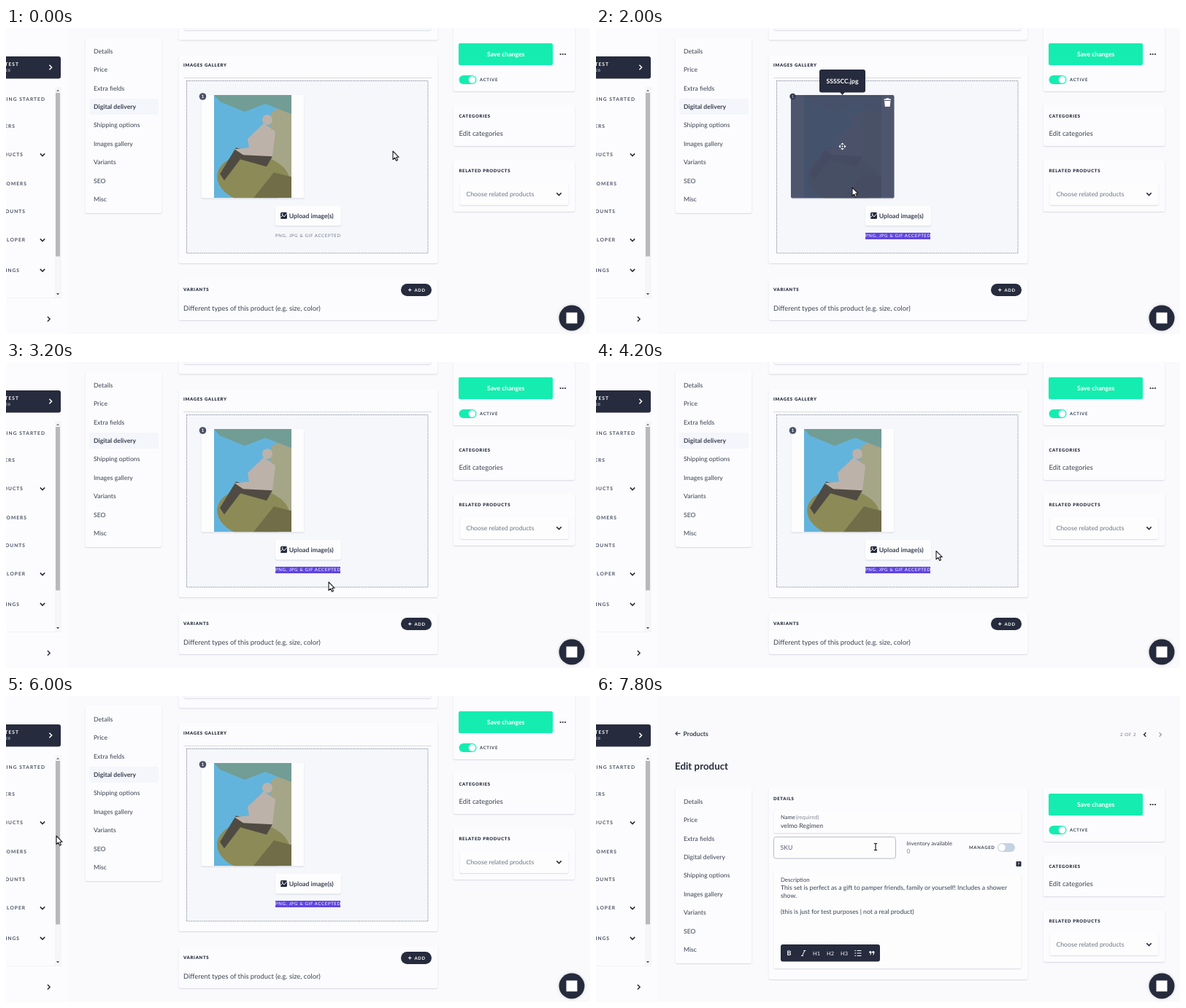
Write an HTML page with a canvas that moves like this. It is 800x420 px and loops after 8000 ms.

```html
<!DOCTYPE html>
<html lang="en">
<head>
<meta charset="utf-8">
<title>Product editor</title>
<style>
html, body { margin: 0; width: 100%; height: 100%; overflow: hidden; background: #fafafd; }
canvas { display: block; width: 800px; height: 420px; }
</style>
</head>
<body>
<canvas id="stage"></canvas>
<script>
const LOOP = 8000, STEP = 200;
const LIST_AT = 6400, EDIT_AT = 7200;
const INK = '#3a4153', DARK = '#262b3d', GREEN = '#15edb0', MUTED = '#6f7687';
const BG = '#fafafd', CARD = '#fcfcfe', LINE = '#d9dbe4';

const canvas = document.getElementById('stage');
const ctx = canvas.getContext('2d');
const dpr = window.devicePixelRatio || 1;
canvas.width = 800 * dpr;
canvas.height = 420 * dpr;
ctx.textRendering = 'geometricPrecision';

// Pointer path: time, x, y
const PATH = [
  [0, 530, 169], [400, 512, 235], [800, 457, 286], [1200, 366, 287], [1400, 372, 276],
  [1800, 353, 226], [2000, 351, 219], [2400, 354, 224], [2800, 398, 282], [3200, 442, 302],
  [3800, 462, 298], [4400, 468, 240], [5000, 380, 183], [5400, 262, 178], [6000, 69, 192],
  [6200, 22, 175], [6600, 291, 211], [7000, 216, 224], [7200, 225, 222], [7800, 383, 207]
];

function pointerAt(t) {
  const i = PATH.findIndex(p => p[0] > t);
  if (i < 0) return PATH[PATH.length - 1].slice(1);
  const [t0, x0, y0] = PATH[i - 1], [t1, x1, y1] = PATH[i];
  const k = (t - t0) / (t1 - t0);
  return [x0 + (x1 - x0) * k, y0 + (y1 - y0) * k];
}

const inside = (x, y, l, t, r, b) => x >= l && x <= r && y >= t && y <= b;
const unit = v => Math.max(0, Math.min(1, v));
const ramp = (t, start, end) => unit((t - start) / 200) - unit((t - end) / 200);

// ---- drawing helpers ----
function rect(x, y, w, h, color, r = 0) {
  ctx.fillStyle = color;
  ctx.beginPath();
  ctx.roundRect(x, y, w, h, r);
  ctx.fill();
}

function panel(x, y, w, h, color = CARD, r = 3) {
  ctx.save();
  ctx.shadowColor = 'rgba(40,48,85,.16)';
  ctx.shadowBlur = 1.5 * dpr;
  ctx.shadowOffsetY = dpr;
  rect(x + 0.5, y, w - 1, h, color, r);
  ctx.restore();
}

function circle(x, y, r, color) {
  ctx.fillStyle = color;
  ctx.beginPath();
  ctx.arc(x, y, r, 0, 7);
  ctx.fill();
}

function trace(points, close) {
  ctx.beginPath();
  points.forEach(([x, y]) => ctx.lineTo(x, y));
  if (close) ctx.closePath();
}

function poly(points, color) {
  trace(points, true);
  ctx.fillStyle = color;
  ctx.fill();
}

function line(points, color, width = 1) {
  trace(points);
  ctx.strokeStyle = color;
  ctx.lineWidth = width;
  ctx.stroke();
}

// y is the middle of the capitals
function text(str, x, y, { size = 8.67, weight = 400, color = INK, align = 'left', gap = 0 } = {}) {
  ctx.font = `${weight} ${size}px Lato, sans-serif`;
  ctx.letterSpacing = gap + 'px';
  ctx.textAlign = align;
  ctx.fillStyle = color;
  ctx.fillText(str, x, y + size * 0.36);
}

const caps = (str, x, y, opts) => text(str, x, y, { size: 6, gap: 0.67, weight: 700, ...opts });
const heading = (str, x, y) => caps(str, x, y, { weight: 900, color: DARK });

function chevron(x, y, dir, color = DARK, s = 3.2) {
  ctx.save();
  ctx.translate(x, y);
  ctx.rotate({ right: 0, down: 1, left: 2, up: 3 }[dir] * Math.PI / 2);
  line([[-s / 2, -s], [s / 2, 0], [-s / 2, s]], color, 1.5);
  ctx.restore();
}

function dots(x, y) {
  for (const d of [-3.2, 0, 3.2]) circle(x + d, y, 1.1, DARK);
}

function addButton(x, y) {
  rect(x, y, 42, 17, DARK, 8.5);
  line([[x + 10, y + 8.5], [x + 14.5, y + 8.5]], '#fff');
  line([[x + 12.2, y + 6.2], [x + 12.2, y + 10.8]], '#fff');
  caps('ADD', x + 18.5, y + 8.5, { color: '#fff' });
}

function toggle(x, y, on) {
  rect(x, y, 24, 12, on ? GREEN : '#c5d2e2', 6);
  circle(x + (on ? 18 : 6), y + 6, 4.8, '#fff');
}

function chat(x) {
  ctx.save();
  ctx.shadowColor = 'rgba(0,0,0,.18)';
  ctx.shadowBlur = 4 * dpr;
  circle(x, 398, 17.5, '#252b3c');
  ctx.restore();
  rect(x - 7.5, 390.5, 15, 15, '#fff');
}

// ---- pictures ----
function artwork(x, y, w, h) {
  ctx.save();
  ctx.translate(x, y);
  ctx.scale(w / 106, h / 141);
  ctx.beginPath();
  ctx.rect(0, 0, 106, 141);
  ctx.clip();
  rect(0, 0, 106, 141, '#62b4dc');
  poly([[78, 24], [106, 8], [106, 141], [70, 141]], '#a5a588');
  poly([[0, 0], [106, 0], [106, 26], [70, 12], [42, 23], [8, 9]], '#719d95');
  ctx.fillStyle = '#8c8a57';
  ctx.beginPath();
  ctx.ellipse(54, 115, 50, 33, 0.12, 0, 7);
  ctx.fill();
  poly([[54, 141], [82, 106], [106, 112], [106, 141]], '#706d48');
  poly([[8, 108], [30, 72], [80, 84], [72, 98], [36, 88], [14, 117]], '#504b42');
  poly([[46, 60], [68, 39], [84, 50], [80, 84], [40, 82], [28, 74], [48, 72]], '#bdb2aa');
  circle(73, 34, 7, '#bdb2aa');
  ctx.restore();
}

function photo(x, y) {
  rect(x, y, 28, 28, '#cbc7c4', 3);
  rect(x, y + 21, 28, 7, '#b8b0aa', 2);
  rect(x + 5, y + 14, 4, 11, '#6b5a50');
  rect(x + 11, y + 16, 4, 9, '#8d7161');
  rect(x + 18, y + 8, 6, 17, '#ebe8e5');
}

// ---- page parts ----
function sidebar(list, hover) {
  const label = (str, right, y, opts) =>
    caps(str, right + 1, y, { size: 6.67, gap: 1, align: 'right', color: '#4a5163', ...opts });

  rect(0, 0, 84, 420, '#fcfcfe');
  rect(-6, 39, 81, 30.5, DARK, 3);
  label('TEST', 17, 49.5, { color: '#fff' });
  label('28', 5.5, 58.5, { size: 5.4, gap: 0.67, weight: 400, color: '#d5d8e2' });
  chevron(61, 54, 'right', '#fff');

  if (list || hover) rect(0, 155, 67, 35, '#f0f2f8');
  const rows = list
    ? [['GETTING STARTED', 53, 95.5], ['ORDERS', 12, 132.5], ['PRODUCTS', 23, 173, 'up'],
       ['CUSTOMERS', 28, 256.5], ['DISCOUNTS', 26, 294], ['DEVELOPER', 26, 333.5, 'down']]
    : [['GETTING STARTED', 53, 97.5], ['ORDERS', 12, 134.5], ['PRODUCTS', 23, 174, 'down'],
       ['CUSTOMERS', 28, 214], ['DISCOUNTS', 26, 251.5], ['DEVELOPER', 26, 291, 'down'],
       ['SETTINGS', 18, 332.5, 'down']];
  for (const [str, right, y, arrow] of rows) {
    label(str, right, y);
    if (arrow) chevron(50, y, arrow);
  }
  if (list) {
    text('Products', 17, 205.5, { weight: 700, align: 'right' });
    text('Categories', 24, 227, { align: 'right' });
  }

  rect(67, 81, 9, 289, '#f6f6f9');
  rect(68, 89, 6, list ? 200 : 224.5, '#b9b9bc');
  poly([[69, 87], [71, 84.5], [73, 87]], '#77777c');
  poly([[69, 364], [71, 366.5], [73, 364]], '#44444a');
  line([[0, 370.5], [76, 370.5]], '#f1f2f6');
  chevron(58.5, 399.5, 'right');
}

const MENU = ['Details', 'Price', 'Extra fields', 'Digital delivery', 'Shipping options',
  'Images gallery', 'Variants', 'SEO', 'Misc'];

function menu(dy, active) {
  panel(108, dy + 13, 106, 241);
  if (active >= 0) rect(114, dy + 97, 95, 22, '#f5f6fb', 3);
  MENU.forEach((label, i) =>
    text(label, 120, dy + 31.5 + i * 25.45, { weight: i === active ? 700 : 400 }));
}

function rightColumn(dy) {
  panel(612, dy ? 126 : -10, 168, dy ? 74 : 97);
  rect(620, dy + 21, 129, 30, GREEN, 2);
  text('Save changes', 684.7, dy + 36, { weight: 700, color: '#fff', align: 'center' });
  dots(762.8, dy + 36);
  toggle(620.5, dy + 65, true);
  caps('ACTIVE', 649, dy + 71);

  panel(612, dy + 105, 168, 57);
  heading('CATEGORIES', 620.5, dy + 120.5);
  text('Edit categories', 620.5, dy + 144.8, { size: 9.33 });

  panel(612, dy + 181, 168, 71);
  heading('RELATED PRODUCTS', 620.5, dy + 195.5);
  panel(621, dy + 213, 150, 30, '#fdfdfe');
  text('Choose related products', 630.5, dy + 228, { color: MUTED });
  chevron(757.5, dy + 228, 'down');
}

function uploadIcon(x, y) {
  rect(x, y, 9, 9, DARK, 1.5);
  line([[x, y + 7], [x + 3, y + 4], [x + 5, y + 6], [x + 9, y + 1.5]], '#fff', 1);
  circle(x + 2.6, y + 2.5, 0.9, '#fff');
}

function hoverLayer(k) {
  ctx.save();
  ctx.globalAlpha = 0.94 * k;
  rect(267, 92, 141.5, 141.5, '#434c65', 2);
  ctx.restore();
  circle(269.5, 94, 4.2, '#343b50');
  text('1', 269.5, 94, { size: 5.5, color: '#c9cedb', align: 'center' });

  rect(394.5, 97.5, 9.5, 1.5, '#fff');
  rect(397.3, 96.3, 4, 1.5, '#fff');
  poly([[395, 100], [403.5, 100], [402.6, 108], [395.9, 108]], '#fff');
  for (let i = 0; i < 4; i++) {
    ctx.save();
    ctx.translate(337.5, 162.5);
    ctx.rotate(i * Math.PI / 2);
    poly([[0, -5], [2.2, -2.5], [-2.2, -2.5]], '#fff');
    ctx.restore();
  }
  circle(337.5, 162.5, 1, '#fff');

  rect(306, 57, 63, 31.5, DARK, 3);
  poly([[334, 88], [341, 88], [337.5, 92]], DARK);
  text('SSSSCC.jpg', 337.5, 73, { weight: 700, color: '#fff', align: 'center' });
}

function galleryPage(t, px) {
  menu(0, 3);
  rightColumn(0);

  panel(236, -10, 356, 26.5);
  panel(243, -10, 340, 13, '#f8f8fc');

  panel(236, 37, 356, 286);
  heading('IMAGES GALLERY', 243, 51);
  line([[243, 68.5], [583, 68.5]], LINE);
  rect(247.5, 72.5, 330.5, 236.5, '#f6f7fb');
  ctx.save();
  ctx.setLineDash([1.5, 1]);
  ctx.strokeStyle = '#8f94a3';
  ctx.lineWidth = 1;
  ctx.strokeRect(247.5, 72.5, 330.5, 236.5);
  ctx.restore();

  panel(267, 92, 141.5, 141.5, '#fdfdfe', 2);
  artwork(285, 92, 106, 141.3);
  const k = ramp(t, 1600, 2500) + ramp(t, 4850, 5350);
  if (k > 0) hoverLayer(k);
  else {
    circle(269.5, 94, 4.8, '#4a5268');
    text('1', 269.5, 94, { size: 6, weight: 700, color: '#fff', align: 'center' });
  }

  panel(368.5, 244, 91, 27.5, '#fdfdfe');
  uploadIcon(376, 253);
  text('Upload image(s)', 387.8, 257.5, { weight: 700 });

  const from = t >= 1200 ? 369 : t >= 800 ? Math.max(369, px) : 458;
  const note = color => caps('PNG, JPG & GIF ACCEPTED', 369, 285.3, { weight: 400, color });
  note(MUTED);
  if (from < 458) {
    ctx.save();
    ctx.beginPath();
    ctx.rect(from, 281, 458 - from, 9);
    ctx.clip();
    rect(from, 281, 458 - from, 9, '#6045e0');
    note('#fff');
    ctx.restore();
  }

  panel(236, 344, 356, 57);
  heading('VARIANTS', 243, 358.7);
  addButton(541, 351);
  text('Different types of this product (e.g. size, color)', 243, 384.5, { size: 9.33 });
}

function listPage(py) {
  text('Products', 108, 55, { size: 13.33, weight: 700, color: DARK });
  addButton(747.5, 46);

  rect(108, 84, 682, 72, '#f4f6fa', 3);
  panel(117, 93, 664, 31);
  ctx.beginPath();
  ctx.arc(130.5, 107, 2.6, 0, 7);
  ctx.strokeStyle = INK;
  ctx.lineWidth = 1.2;
  ctx.stroke();
  line([[132.3, 109], [135, 111.8]], INK, 1.3);
  text('Search', 141.5, 108.5, { color: MUTED });
  line([[108, 133.5], [790, 133.5]], '#e7e9f1');
  [['PRODUCT', 117], ['REMAINING', 457], ['ORDERS', 516], ['SALES', 629], ['OPTIONS', 743]]
    .forEach(([label, x]) => caps(label, x, 144.7, { color: '#4a5163' }));

  ['an 2', 'velmo Regimen'].forEach((name, i) => {
    const top = 156 + i * 47, y = top + 24;
    const hover = py >= top && py < top + 47;
    rect(108, top, 682, 47, hover ? '#f6f7fb' : CARD);
    if (i) photo(117.5, 213);
    else {
      ctx.save();
      ctx.beginPath();
      ctx.roundRect(117.5, 165.5, 28, 28, 3);
      ctx.clip();
      artwork(117.5, 160.5, 28, 38);
      ctx.restore();
    }
    text(name, 155, y);
    rect(461, y + 0.5, 5, 1.4, '#888d9a');
    text('0', 516, y);
    text('€0.00', 629, y, { color: '#176352' });
    dots(752, y - 0.5);
  });
  line([[108, 250.5], [790, 250.5]], '#e2e4ec');
  line([[108, 297.5], [790, 297.5]], '#e6e8ef');

  caps('© 2021 ZUVO MERCHANT, INC.', 108, 320.5, { weight: 400, color: MUTED });
  circle(626.8, 320.5, 3.5, '#2be5b0');
  [['STATUS', 634.5], ['DOCUMENTATION', 678.5], ['SUPPORT', 758]]
    .forEach(([label, x]) => caps(label, x, 320.5, { color: '#4a5163' }));
}

function toolbar() {
  rect(253, 341, 136, 23.5, DARK, 3);
  const white = { color: '#fff', align: 'center' };
  text('B', 264.5, 353, { ...white, size: 9, weight: 700 });
  line([[282.5, 356.5], [285.8, 349.5]], '#fff');
  line([[281, 356.5], [284, 356.5]], '#fff');
  line([[284.3, 349.5], [287.3, 349.5]], '#fff');
  ['H1', 'H2', 'H3'].forEach((label, i) => text(label, 302 + i * 19, 353, { ...white, size: 7.3 }));
  for (const y of [349.5, 353, 356.5]) {
    circle(355.2, y, 0.8, '#fff');
    line([[357.5, y], [363.5, y]], '#fff');
  }
  for (const x of [375.8, 379.8]) {
    circle(x, 351.5, 1.6, '#fff');
    line([[x + 1.2, 351.5], [x, 355.5]], '#fff');
  }
}

function editPage() {
  line([[115.5, 51.5], [109, 51.5]], INK, 1.2);
  line([[111.7, 48.8], [109, 51.5], [111.7, 54.2]], INK, 1.2);
  text('Products', 119.5, 51.5, { weight: 700 });
  caps('2 OF 2', 718, 53, { weight: 400, color: MUTED });
  chevron(752, 53, 'left', DARK, 2.8);
  chevron(773, 53, 'right', '#9da2af', 2.8);
  text('Edit product', 108, 96, { size: 13.33, weight: 700, color: DARK });

  menu(113, -1);
  rightColumn(113);
  panel(236, 126, 356, 263);
  heading('DETAILS', 243, 140.5);

  const small = { size: 7.6 };
  panel(243, 157, 340, 31, '#fdfdfe', 2);
  text('Name', 253, 166.5, small);
  text('(required)', 273.7, 166.5, { ...small, color: '#858b99' });
  text('velmo Regimen', 253, 178);

  rect(243.5, 193.5, 167, 29.5, '#fdfdfe', 3);
  ctx.strokeStyle = '#b9bdc9';
  ctx.lineWidth = 1;
  ctx.stroke();
  text('SKU', 252.5, 208, { color: '#596073' });
  text('Inventory available', 425.5, 202, small);
  text('0', 425.5, 213, { color: '#8d93a0' });
  caps('MANAGED', 511, 208);
  toggle(550, 202, false);
  rect(575.5, 227, 7, 7, DARK, 1);
  text('?', 579, 230.6, { size: 6, weight: 700, color: '#fff', align: 'center' });

  panel(243, 243, 340, 131, '#fdfdfe', 2);
  text('Description', 253, 252, { size: 7.8 });
  text('This set is perfect as a gift to pamper friends, family or yourself! Includes a shower', 253, 263);
  text('show.', 253, 273.5);
  text('(this is just for test purposes | not a real product)', 253, 295.5);
  toolbar();
}

// ---- pointer ----
const ARROW = [[0, 0], [0, 11.5], [2.7, 9], [4.6, 13.2], [6.5, 12.3], [4.7, 8.3], [8.2, 8.3]];
const HAND = [[-1, 0], [0.8, 0], [1, 4], [5, 4.6], [6.4, 5.6], [5.6, 10], [-0.5, 10], [-3.4, 6], [-2.4, 5], [-1, 6]];

function pointer(x, y, kind) {
  ctx.save();
  ctx.translate(x, y);
  ctx.lineJoin = 'round';
  if (kind === 'beam') {
    for (const [color, w] of [['#fff', 2.6], ['#222', 1.2]]) {
      line([[0, -4.5], [0, 4.5]], color, w);
      line([[-2.2, -4.5], [2.2, -4.5]], color, w);
      line([[-2.2, 4.5], [2.2, 4.5]], color, w);
    }
  } else {
    poly(kind === 'hand' ? HAND : ARROW, '#fff');
    ctx.strokeStyle = '#1d1d22';
    ctx.lineWidth = 1.1;
    ctx.stroke();
  }
  ctx.restore();
}

function pointerKind(page, x, y) {
  if (page === 'list') return 'hand';
  if (page === 'edit') return inside(x, y, 243, 193, 411, 223) ? 'beam' : 'arrow';
  if (inside(x, y, 366, 281, 459, 290)) return 'beam';
  return x < 67 || inside(x, y, 108, 20, 214, 254) ? 'hand' : 'arrow';
}

function draw(t) {
  const page = t >= EDIT_AT ? 'edit' : t >= LIST_AT ? 'list' : 'gallery';
  const [x, y] = pointerAt(t);
  ctx.setTransform(dpr, 0, 0, dpr, 0, 0);
  rect(0, 0, 800, 420, BG);
  sidebar(page === 'list', x < 67);
  if (page === 'gallery') galleryPage(t, x);
  else if (page === 'list') listPage(y);
  else editPage();
  chat(page === 'list' ? 784 : 775);
  if (page === 'list') {
    rect(0, 415, 95, 5, '#f1f2f5');
    text('board/shop/products/item', 92, 419.5, { size: 8, color: '#8b8f98', align: 'right' });
  }
  pointer(x, y, pointerKind(page, x, y));
}

function tick(now) {
  draw(Math.floor((now % LOOP) / STEP) * STEP);
  requestAnimationFrame(tick);
}
draw(0);
requestAnimationFrame(tick);
</script>
</body>
</html>
```
